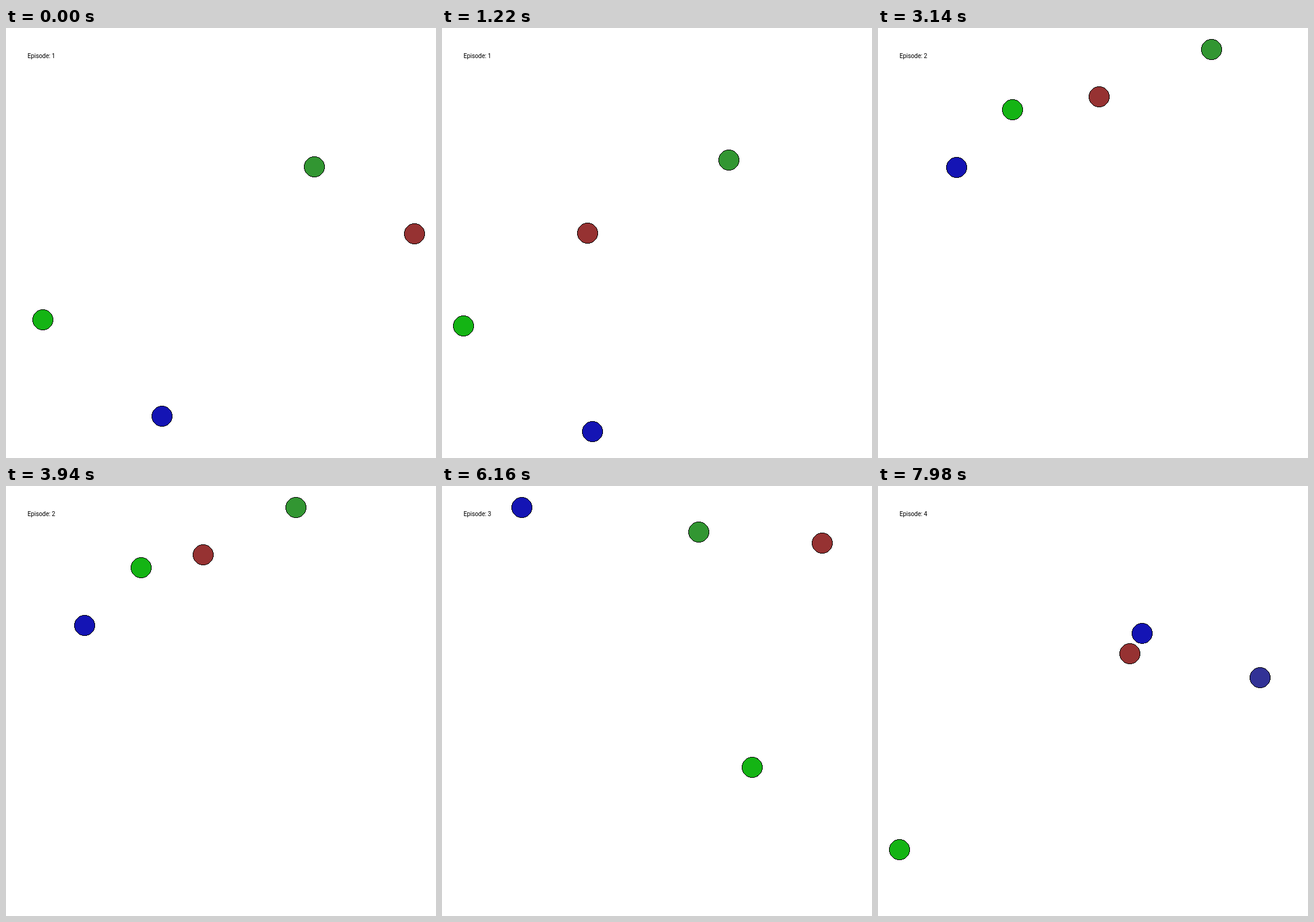
Write an HTML page that moves like this. It is 700x700 px and loops after 8000 ms.

```html
<!DOCTYPE html>
<html lang="en">
<head>
<meta charset="utf-8">
<title>Episodes</title>
<style>
  html, body { margin: 0; width: 100%; height: 100%; overflow: hidden; background: #fff; }
  svg { display: block; width: 100%; height: 100%; }
  circle { stroke: #000; stroke-width: 1; shape-rendering: crispEdges; }
  text { font: 10px Roboto, sans-serif; letter-spacing: -0.1px; fill: #000; }
</style>
</head>
<body>
<svg viewBox="0 0 700 700">
  <g id="discs"></g>
  <text id="label" x="35" y="49"></text>
</svg>
<script>
const LOOP = 8000, EPISODE = 2320, FIRST = 20, STEP = 100;
const CENTER = 350, REACH = 315, KEEP = 0.75;
const RED = 'rgb(150,50,50)', GREEN = 'rgb(50,150,50)', BLUE = 'rgb(50,50,150)';
const MARKS = ['rgb(20,180,20)', 'rgb(20,20,180)'];

// Positions are relative to the centre; a push is [steps, ax, ay].
const episodes = [
  {
    color: GREEN,
    agents: [
      { at: [315, -14.9], push: [[7, -16.02, 0]] },
      { at: [152, -124.2], push: [[9, -0.96, 0], [15, -1.67, 0]] }
    ],
    marks: [[-290, 124.6], [-96.4, 282.4]]
  },
  {
    color: GREEN,
    agents: [
      { at: [272, -238.6], push: [[5, -15.3, 0]] },
      { at: [268.1, -315], push: [[4, -3.3, -0.018], [8, -2.64, -0.018], [12, -1.47, -0.018]] }
    ],
    marks: [[-130.7, -217.6], [-222.3, -123.2]]
  },
  {
    color: GREEN,
    agents: [
      { at: [-134.1, -257], push: [[6, 17.2, 0]] },
      { at: [-258, 135], push: [[6, 13.92, -16.62], [1, 0, -5.3]] }
    ],
    marks: [[155, 108], [-220, -315]]
  },
  {
    color: BLUE,
    agents: [
      { at: [287.6, -77], push: [[3, -16.5, 0], [4, -3.05, 0]] },
      { at: [311.8, -31.2], push: [[24, -1.235, -0.21]] }
    ],
    marks: [[-315, 242], [80, -110]]
  }
];

// Damped motion: each step keeps part of the speed and adds the push.
function travel({ at, push }, steps) {
  let [x, y] = at, vx = 0, vy = 0;
  const forces = push.flatMap(([n, ax, ay]) => Array(n).fill([ax, ay]));
  for (let i = 0; i < steps; i++) {
    const [ax, ay] = forces[i] || [0, 0];
    vx = vx * KEEP + ax;
    vy = vy * KEEP + ay;
    x += vx;
    y += vy;
  }
  return [x, y];
}

const discs = [RED, GREEN, ...MARKS].map(fill => {
  const c = document.createElementNS('http://www.w3.org/2000/svg', 'circle');
  c.setAttribute('r', 16.5);
  c.setAttribute('fill', fill);
  document.getElementById('discs').append(c);
  return c;
});
const label = document.getElementById('label');

function draw(time) {
  const index = Math.floor(time / EPISODE);
  const local = time - index * EPISODE;
  const step = local < FIRST ? 0 : 1 + Math.floor((local - FIRST) / STEP);
  const { color, agents, marks } = episodes[index];
  const points = [...agents.map(a => travel(a, step)), ...marks];

  // The camera always fits the farthest coordinate.
  const zoom = REACH / Math.max(...points.flat().map(Math.abs));
  points.forEach(([x, y], i) => {
    discs[i].setAttribute('cx', Math.round(CENTER + x * zoom));
    discs[i].setAttribute('cy', Math.round(CENTER + y * zoom));
  });
  discs[1].setAttribute('fill', color);
  label.textContent = `Episode: ${index + 1}`;
}

const start = performance.now();
function tick() {
  draw((performance.now() - start) % LOOP);
  requestAnimationFrame(tick);
}
tick();
</script>
</body>
</html>
```
